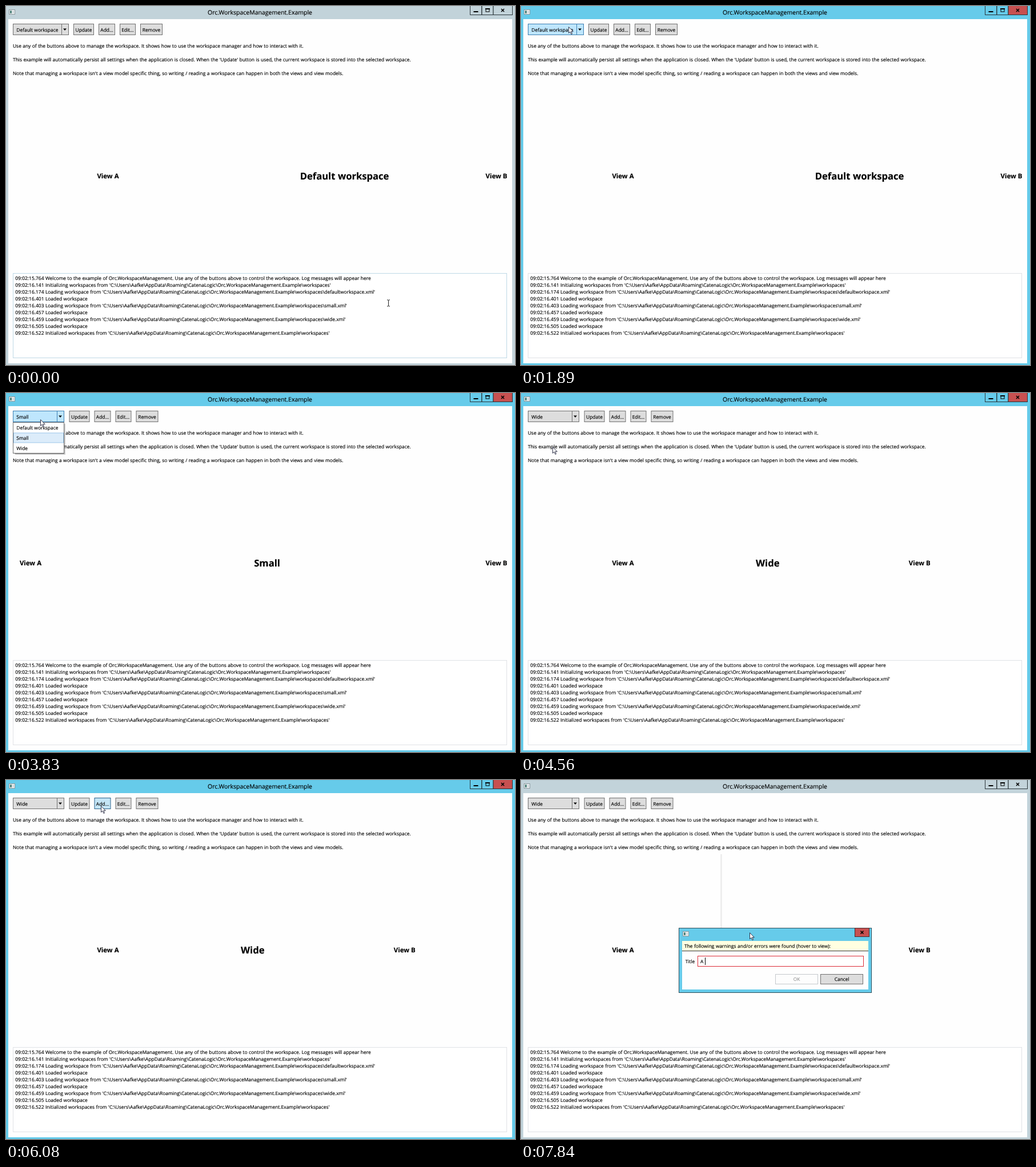
Recreate the animation shown at these times as an HTML page. Size 891 by 629 pixels, loop 8 s.

```html
<!DOCTYPE html>
<html lang="en">
<head>
<meta charset="utf-8">
<title>Workspace management</title>
<style>
  html, body { margin: 0; width: 891px; height: 629px; overflow: hidden; background: #fff; }
  svg { display: block; }
  text {
    font: 8.42px "Open Sans", "Noto Sans", sans-serif;
    word-spacing: .25px;
    text-rendering: geometricPrecision;
    white-space: pre;
    fill: #000;
    stroke: #000;
    stroke-width: .15px;
  }
  .log { font-size: 8.45px; }
  .title { font-size: 10.5px; }
  .view { font-size: 11.4px; font-weight: 700; }
  .head { font-size: 16.6px; font-weight: 700; }
  .mid { text-anchor: middle; }
  .dim { fill: #838383; stroke: none; }
</style>
</head>
<body>
<svg id="stage" width="891" height="629" viewBox="0 0 891 629"></svg>
<script>
const LOOP = 8000;
const TICK = 119; // the screen refreshes in even steps
const stage = document.getElementById('stage');

// Pointer moves: [start, end, x, y], resting in between
const home = { x: 669, y: 520 };
const moves = [
  [0, 230, 647, 551],
  [830, 1530, 330, 8],
  [1530, 1890, 83, 36],
  [1890, 2010, 70, 40],
  [2260, 2610, 57, 78],
  [3470, 3710, 60, 46],
  [3830, 4200, 55, 94],
  [5050, 5350, 55, 55],
  [5390, 5830, 166, 45],
  [6440, 6890, 399, 267],
  [6890, 7130, 400, 267]
];

// Column edges place the three views
const workspaces = [
  { name: 'Default workspace', left: 350.5, right: 834.5 },
  { name: 'Small', left: 79.5, right: 834.5 },
  { name: 'Wide', left: 350.5, right: 513 }
];

const intro = [
  'Use any of the buttons above to manage the workspace. It shows how to use the workspace manager and how to interact with it.',
  "This example will automatically persist all settings when the application is closed. When the 'Update' button is used, the current workspace is stored into the selected workspace.",
  "Note that managing a workspace isn't a view model specific thing, so writing / reading a workspace can happen in both the views and view models."
];
const dir = String.raw`C:\Users\Aafke\AppData\Roaming\CatenaLogic\Orc.WorkspaceManagement.Example\workspaces`;
const log = [
  '15.764 Welcome to the example of Orc.WorkspaceManagement. Use any of the buttons above to control the workspace. Log messages will appear here',
  `16.141 Initializing workspaces from '${dir}'`,
  `16.174 Loading workspace from '${dir}\\defaultworkspace.xml'`,
  '16.401 Loaded workspace',
  `16.403 Loading workspace from '${dir}\\small.xml'`,
  '16.457 Loaded workspace',
  `16.459 Loading workspace from '${dir}\\wide.xml'`,
  '16.505 Loaded workspace',
  `16.522 Initialized workspaces from '${dir}'`
];

const rect = (x, y, w, h, fill, stroke = 'none', alpha = 1) =>
  `<rect x="${x}" y="${y}" width="${w}" height="${h}" fill="${fill}" stroke="${stroke}" opacity="${alpha}"/>`;
const text = (x, y, s, cls = '') => `<text x="${x}" y="${y}" class="${cls}">${s}</text>`;
const shape = (d, fill, stroke = 'none', width = 1) =>
  `<path d="${d}" fill="${fill}" stroke="${stroke}" stroke-width="${width}"/>`;
const mix = (p, q, k) => `rgb(${p.map((v, i) => Math.round(v + (q[i] - v) * k))})`;
const within = (p, x, y, w, h) => p.x >= x && p.x <= x + w && p.y >= y && p.y <= y + h;
const between = (t, a, b) => t >= a && t < b;
const clamp = v => Math.min(1, Math.max(0, v));
const ease = k => k * k * (3 - 2 * k);

function pointerAt(t) {
  let { x, y } = home;
  for (const [a, b, tx, ty] of moves) {
    const k = ease(clamp((t - a) / (b - a)));
    x += (tx - x) * k;
    y += (ty - y) * k;
  }
  return { x: Math.round(x), y: Math.round(y) };
}

const appIcon = (x, y) =>
  rect(x + .5, y + .5, 10, 8, '#f4f8f9', '#8b979c') +
  rect(x + 2, y + 2, 3, 5, '#4d7f78') + rect(x + 6, y + 2, 3, 5, '#cfd8dc');

const cross = (x, y) => shape(`M${x - 2.5} ${y - 2.5}l5 5m0-5l-5 5`, 'none', '#000', 1.6);

function frame(active) {
  const idle = [194, 211, 218];
  const bar = mix(idle, [102, 203, 234], active);
  const close = mix(idle, [199, 80, 80], active);
  const edge = '#2b363b';
  return rect(0, 0, 891, 629, bar) + rect(4, 23, 882, 603, '#fefefe') + appIcon(5, 6) +
    text(444.5, 14.5, 'Orc.WorkspaceManagement.Example', 'title mid') +
    rect(812.5, -.5, 20.3, 16, 'none', edge) + rect(832.8, -.5, 20.2, 16, 'none', edge) +
    rect(853, -.5, 33.5, 16, close, edge) +
    rect(818.5, 9, 8, 2, '#000') + rect(840, 5, 6, 5, 'none', '#000') +
    rect(839, 4, 8, 2, '#000') + cross(869.5, 7.5);
}

function button(x, w, label, p, pressed) {
  const over = p && within(p, x, 31, w, 19);
  const [fill, edge] = pressed ? ['#c4e5f6', '#2c628b']
    : over ? ['#bee6fd', '#3c7fb1'] : ['#ddd', '#707070'];
  return rect(x, 31.5, w, 19, fill, edge) + text(x + w / 2, 44.8, label, 'mid');
}

function toolbar(t, sel, p) {
  const shift = sel ? -7.5 : 0;
  const right = sel ? 101.5 : 109.5;
  const over = p && within(p, 12, 31, right - 12, 19);
  const edge = over ? '#3c7fb1' : '#707070';
  return rect(12.5, 31.5, right - 12.5, 19, over ? '#bee6fd' : '#ddd', edge) +
    shape(`M${right - 12} 32v18`, 'none', edge) +
    shape(`M${right - 9.5} 39.5h6l-3 3.6z`, '#000') +
    text(18.3, 44.8, workspaces[sel].name) +
    button(118.5 + shift, 35, 'Update', p) +
    button(162.5 + shift, 28, 'Add...', p, between(t, 6060, 6180)) +
    button(199.5 + shift, 27, 'Edit...', p) +
    button(235.5 + shift, 38, 'Remove', p);
}

function popup(sel, p) {
  const w = sel ? 89 : 97;
  const hot = p.y > 51 ? Math.min(2, Math.floor((p.y - 52) / 18)) : sel;
  return rect(16, 54, w - 1, 54, '#000', 'none', .2) + rect(15, 53, w - 2, 53.5, '#000', 'none', .45) +
    rect(12.5, 51.5, w, 54, '#fff', '#707070') +
    rect(13.5, 52 + hot * 18, w - 2, 17, '#dcecfa', '#9cc6ea') +
    workspaces.map((v, i) => text(18.3, 64.2 + i * 18, v.name)).join('');
}

function dialog(t) {
  const typed = t >= 7840 ? 2 : t >= 7720 ? 1 : 0;
  const caret = t < 6890 || t >= 7480;
  return rect(276.5, 259.5, 337, 113, '#66cbea', '#2f4f5b') + rect(282, 282, 326, 85, '#fefefe') +
    appIcon(283, 265) + rect(584.5, 259.5, 25, 15, '#c75050', '#4a2a2e') + cross(597, 267) +
    rect(282, 282, 326, 18, '#ffffe1') + rect(282, 299, 326, 1, '#333') +
    text(286, 294.3, 'The following warnings and/or errors were found (hover to view):') +
    text(287.7, 321, 'Title') + rect(309.5, 308.5, 290, 18, '#fff', '#dc2a36') +
    text(314, 321, 'A '.slice(0, typed)) +
    (caret ? rect(314 + (typed && 4 + typed * 2), 311, 1, 13, '#000') : '') +
    rect(445.5, 340.5, 74, 17, '#fdfdfd', '#c4c8cc') + text(482.7, 352.2, 'OK', 'mid dim') +
    rect(524.5, 340.5, 74, 17, '#ddd', '#707070') + text(561.7, 352.2, 'Cancel', 'mid');
}

function pointer(p, beam) {
  const look = beam
    ? shape('M-2-5h2l.5.5.5-.5h2M-2 6h2l.5-.5.5.5h2M.5-4.5v10', 'none', '#222')
    : shape('M.5.7V11.5L3 9.2 5 13.5 6.6 12.8 4.8 8.7H8.3Z', '#fff', '#1c2038', .9);
  return `<g transform="translate(${p.x} ${p.y})">${look}</g>`;
}

function scene(t) {
  const p = pointerAt(t);
  const modal = t >= 6420;
  const active = modal ? 0 : clamp((t - 1550) / 200);
  const sel = t >= 4400 ? 2 : t >= 2730 ? 1 : 0;
  const open = between(t, 2260, 2730) || between(t, 3680, 4400);
  const inLog = within(p, 12, 468, 865, 149);
  const { name, left, right } = workspaces[sel];
  return frame(active) + toolbar(t, sel, modal ? null : p) +
    intro.map((s, i) => text(12, 72.7 + i * 24, s)).join('') +
    (modal && p.x > left ? rect(349, 130, 3, 130, '#eee') : '') +
    text((6.5 + left) / 2, 302, 'View A', 'view mid') +
    text((left + right) / 2, 304, name, 'head mid') +
    text((right + 882.5) / 2, 302, 'View B', 'view mid') +
    rect(12.5, 468.5, 864, 148, '#fff', inLog ? '#bfd9e6' : '#e0e2e6') +
    log.map((s, i) => text(16.3, 479.9 + i * 11.95, '09:02:' + s, 'log')).join('') +
    (open ? popup(sel, p) : '') + (modal ? dialog(t) : '') + pointer(p, inLog);
}

let shown = -1;
function draw() {
  const now = performance.now() % LOOP;
  const t = Math.floor((now + 15) / TICK) * TICK;
  if (t !== shown) stage.innerHTML = scene(shown = t);
  requestAnimationFrame(draw);
}
draw();
</script>
</body>
</html>
```
